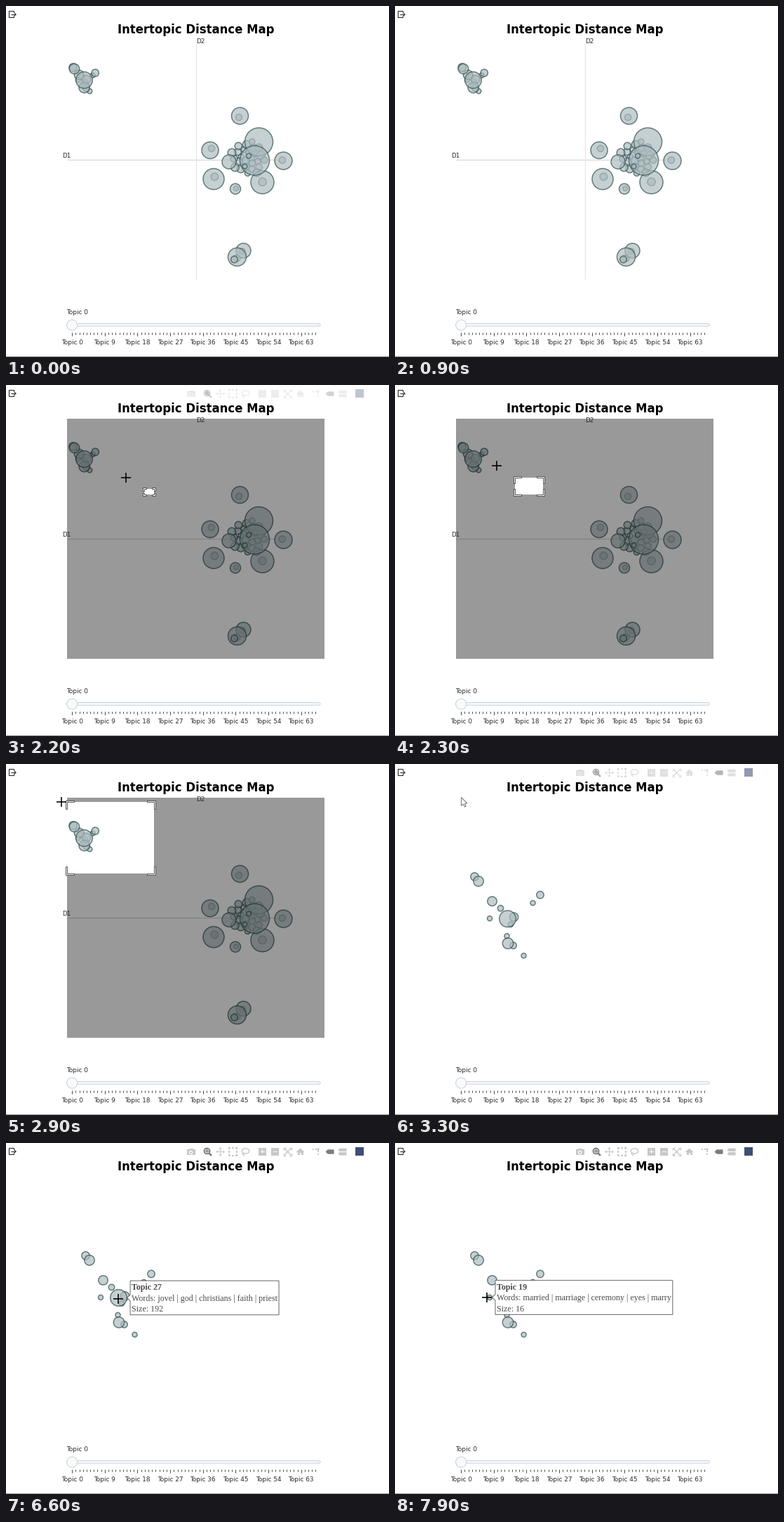
A matplotlib script that plays this animation: 546x500 px, repeating every 8 s.

```python
import numpy as np
import matplotlib.pyplot as plt
from matplotlib.animation import FuncAnimation
from matplotlib.patches import Circle, FancyBboxPatch, PathPatch, Polygon, Rectangle
from matplotlib.path import Path

W, H, DPI = 546, 500, 100
PX = 72 / DPI                       # points per pixel
LEFT, RIGHT, TOP, BOTTOM = 87, 454, 49, 391
DRAG = (211, 157)                   # where the zoom box begins
ZOOM_X, ZOOM_Y, ZOOM_TOP = 2.96, 3.33, 54.4
DRAG_ON, RELEASE = 2.1, 3.1
PALE, DARK = "#c7c7c7", "#7c7c7c"
rng = np.random.default_rng(5)

fig = plt.figure(figsize=(W / DPI, H / DPI), dpi=DPI, facecolor="white")
ax = fig.add_axes([0, 0, 1, 1])
ax.set_xlim(0.5, W + 0.5)
ax.set_ylim(H + 0.5, 0.5)
ax.axis("off")


def line(pts, color, width=1.0, z=1):
    x, y = zip(*pts)
    return ax.plot(x, y, color=color, lw=width * PX, zorder=z,
                   solid_capstyle="butt", solid_joinstyle="miter")[0]


def label(x, y, s, px=8.9, color="#2a2a2a", z=6, **kw):
    kw.setdefault("family", "DejaVu Sans")
    return ax.text(x, y, s, fontsize=px * PX, color=color, va="baseline", zorder=z, **kw)


def shape(patch, z=1):
    patch.set_zorder(z)
    return ax.add_patch(patch)


def bubble(x, y, r):
    return shape(Circle((x, y), r, fc="#AEBCBF", ec="#2F4F4F", lw=1.5 * PX, alpha=0.7), 2)


# ---- page furniture
label(271.5, 40, "Intertopic Distance Map", 16.5, "black", ha="center", weight="bold")
shape(Rectangle((0, H - 0.5), W + 1, 1, fc="#999999", ec="none"))
line([(11, 10), (11, 8), (4, 8), (4, 17), (11, 17), (11, 15)], "#2b2b2b", 1.1)
line([(7, 12.5), (14, 12.5)], "#2b2b2b", 1.1)
line([(12, 10), (14.5, 12.5), (12, 15)], "#2b2b2b", 1.1)

# ---- slider
label(87, 440, "Topic 0")
shape(FancyBboxPatch((87, 453), 361.5, 3.6, boxstyle="round,pad=0,rounding_size=1.8",
                     fc="#F8FAFC", ec="#C4CADB", lw=0.9 * PX))
shape(Circle((94.7, 455), 7.5, fc="#F8FBFB", ec="#C6CED8", lw=0.9 * PX), 2)
for k in range(68):
    x = 94.7 + 5.183 * k
    major = k % 9 == 0
    line([(x, 465.8), (x, 471 if major else 468.8)], "#333333", 0.9)
    if major:
        label(x, 483, f"Topic {k}", ha="center")

# ---- corner group, zoomed positions from the largest topic to the smallest
corner = [(161, 221), (161.5, 256), (119.5, 167.5), (139, 196), (170, 218.5), (114, 161),
          (207.5, 187), (169, 259), (151, 206), (165.5, 229), (197, 198.5), (135.5, 220.5),
          (160, 245.5), (184, 273.5)]


def rank_radius(k):
    return max(3.5, 8.2 - 0.5 * k) if k else 11.8


def unzoom(x, y):
    return LEFT + (x - LEFT) / ZOOM_X, ZOOM_TOP + (y - TOP) / ZOOM_Y


ranked = [(k, p) for k, p in enumerate(corner)][::-1]
detail = [bubble(*p, rank_radius(k)) for k, p in ranked]
overview = [bubble(*unzoom(*p), rank_radius(k)) for k, p in ranked]

# ---- other topics: a dense core, lone bubbles with a small one inside, and the largest
lone = [(334, 157, 12), (291.5, 206, 12), (296.5, 247, 15), (366, 251.5, 16.5),
        (396, 221, 12.5), (327.5, 261, 7.5), (339, 349, 10.5), (330, 358, 13)]
top = [(361, 194, 20), (355, 220.5, 21), (318.5, 222.5, 10),
       (326, 361.5, 4.8), (346.5, 214, 3.5), (341, 229, 3.4)]
for k in range(26):
    d, a = 25 * np.sqrt((k + 0.5) / 26), 2.4 * k
    overview.append(bubble(346 + d * np.cos(a), 217 + d * np.sin(a), rng.uniform(4, 6)))
for x, y, r in lone:
    dx, dy = rng.uniform(-0.22, 0.22, 2) * r
    overview.append(bubble(x + dx, y + dy, 1.5 + 0.25 * r))
overview += [bubble(*b) for b in lone + top]

overview += [line([(LEFT, 220), (385, 220)], "#d6d8d8", 1.2),
             label(81, 216.5, "D1"), label(272, 53.5, "D2")]
v_axis = line([(271, 55), (271, 390)], "#e2e5e6", 1.2)

# ---- zoom box
shade = shape(PathPatch(Path([(0, 0)]), fc="black", ec="none", alpha=0.4), 4)
marks = shape(PathPatch(Path([(0, 0)]), fc="white", ec="#444444", lw=0.9 * PX), 5)


def compound(polys):
    return Path.make_compound_path(*[Path(p + p[:1], closed=True) for p in polys])


def bracket(x, y, ox, oy, arm, thick=2):
    return [(x + ox * thick, y + oy * thick), (x - ox * arm, y + oy * thick),
            (x - ox * arm, y), (x, y), (x, y - oy * arm), (x + ox * thick, y - oy * arm)]


def set_zoom_box(x0, y0):
    x1, y1 = DRAG
    shade.set_path(compound([
        [(LEFT, TOP), (RIGHT, TOP), (RIGHT, BOTTOM), (LEFT, BOTTOM)],
        [(x0, y0), (x0, y1), (x1, y1), (x1, y0)]]))
    arm = min(x1 - x0, y1 - y0, 30) / 3
    marks.set_path(compound([bracket(x, y, ox, oy, arm) for x, ox in ((x0, -1), (x1, 1))
                             for y, oy in ((y0, -1), (y1, 1))]))


# ---- toolbar icons, each drawn around (x, MID)
MID = 13
SIGNS = (-1, 1)


def box(x, dy, w, h, color=PALE):
    return shape(Rectangle((x - w / 2, MID + dy - h / 2), w, h, fc=color, ec="none"), 6)


def disc(x, dy, r, color=PALE):
    return shape(Circle((x, MID + dy), r, fc=color, ec="none"), 6)


def poly(x, pts, color=PALE):
    return shape(Polygon([(x + u, MID + v) for u, v in pts], fc=color, ec="none"), 6)


def stroke(x, pts, color=PALE, width=1.4):
    return line([(x + u, MID + v) for u, v in pts], color, width, 6)


def camera(x):
    return [box(x, 1, 12, 8), box(x, -3.5, 6, 2), disc(x, 1, 2.8, "white"), disc(x, 1, 1.5)]


def plus(x, dy=0, color="white"):
    return [box(x, dy, 6, 1.7, color), box(x, dy, 1.7, 6, color)]


def magnifier(x):
    return [disc(x - 1, -1, 4.9, DARK), stroke(x, [(1, 1), (5.5, 5.5)], DARK, 2.6),
            disc(x - 1, -1, 3.3, "#d5d5d5")] + plus(x - 1, -1, DARK)


def pan(x):
    heads = [[(6.5, 0), (4, 2.3), (4, -2.3)], [(-6.5, 0), (-4, 2.3), (-4, -2.3)]]
    heads += [[(v, u) for u, v in h] for h in heads]
    return [box(x, 0, 10, 1.4), box(x, 0, 1.4, 10)] + [poly(x, h) for h in heads]


def dashed_box(x):
    return [part for e in (-5.5, 5.5) for d in (-4.7, 0, 4.7)
            for part in (box(x + d, e, 2.6, 1.3), box(x + e, d, 1.3, 2.6))]


def lasso(x):
    a = np.linspace(0, 2 * np.pi, 40)
    return [stroke(x, list(zip(5.3 * np.cos(a), -1 - 3.6 * np.sin(a)))),
            stroke(x, [(-3.5, 1), (-4, 3.5), (-1.5, 5.5)])]


def zoom_in(x):
    return [box(x, 0, 11, 11)] + plus(x)


def zoom_out(x):
    return [box(x, 0, 11, 11), box(x, 0, 6, 1.7, "white")]


def autoscale(x):
    parts = []
    for sx in SIGNS:
        for sy in SIGNS:
            parts += [stroke(x, [(0, 0), (4.5 * sx, 4.5 * sy)]),
                      stroke(x, [(2.2 * sx, 5.5 * sy), (5.5 * sx, 5.5 * sy),
                                 (5.5 * sx, 2.2 * sy)])]
    return parts


def home(x):
    return [poly(x, [(-6, 0.5), (0, -5), (6, 0.5)]), box(x, 2.4, 8, 4.4),
            box(x, 3.3, 2, 2.8, "white")]


def spikes(x):
    return ([disc(x + 1.5, -3.5, 1.7)] + [box(x - d, -3.5, 2, 1.3) for d in (2, 5.5)]
            + [box(x + 1.5, d, 1.3, 2) for d in (0, 3.5)])


def tag(x, dy, h, color):
    return poly(x, [(-6, dy), (h - 6, dy - h), (6, dy - h), (6, dy + h), (h - 6, dy + h)], color)


def hover_one(x):
    return [tag(x, 0, 3.2, DARK)]


def hover_all(x):
    return [tag(x, dy, 2.2, PALE) for dy in (-2.7, 2.8)]


def badge(x):
    return [box(x, 0, 12, 12, "#3f4f75")]


groups = [[camera], [magnifier, pan, dashed_box, lasso], [zoom_in, zoom_out, autoscale, home],
          [spikes, hover_one, hover_all], [badge]]
toolbar, x = [], 264
for group in groups:
    for icon in group:
        toolbar += icon(x)
        x += 18
    x += 6


# ---- hover labels
def tooltip(point, topic, words, size):
    x, y = point
    tip = x + 0.87 * np.sqrt(size)
    x0 = tip + 4.5
    rows = [(f"Topic {topic}", "bold"), ("Words: " + " | ".join(words), "normal"),
            (f"Size: {size}", "normal")]
    texts = [label(x0 + 2.3, y - 11.2 + 15.6 * k, s, 12, "#4c4c4c", z=9,
                   family="Liberation Serif", weight=w) for k, (s, w) in enumerate(rows)]
    x1 = x0 + 4 + texts[1].get_window_extent(fig.canvas.get_renderer()).width
    t, b = y - 24.3, y + 24.3
    frame = Polygon([(tip, y), (x0, y - 4.5), (x0, t), (x1, t), (x1, b), (x0, b), (x0, y + 4.5)],
                    fc="white", ec="#555555", lw=0.9 * PX)
    return texts + [shape(frame, 8)]


tips = [
    (4.5, 5.7, tooltip(corner[4], 24, ["hell", "atheists", "atheist", "god", "exist"], 63)),
    (5.7, 7.0, tooltip(corner[0], 27, ["jovel", "god", "christians", "faith", "priest"], 192)),
    (7.0, 8.0, tooltip(corner[11], 19,
                       ["married", "marriage", "ceremony", "eyes", "marry"], 16)),
]

# ---- pointer
cross = [line([(0, 0), (1, 0)], "black", 1.6, 11) for _ in range(2)]
arrow = shape(Polygon([(0, 0), (1, 0), (0, 1)], fc="white", ec="#666666", lw=0.9 * PX), 11)
ARROW = np.array([(0, 0), (0, 12), (2.8, 9.5), (4.8, 13.6), (6.6, 12.8), (4.8, 8.9), (8.4, 8.6)])

ENTER = 1.1
START = (480, 95)
# start time, end time and goal of each pointer move
MOVES = [(ENTER, 1.7, (225, 151)), (1.7, 1.9, DRAG), (2.05, 2.3, (146, 116)),
         (2.3, 2.7, (79, ZOOM_TOP)), (RELEASE, 3.3, (95, 48)), (3.3, 4.5, (177, 209)),
         (5.4, 6.0, (160.5, 223)), (6.7, 7.3, (131, 220.5))]


def pointer(t):
    pos = np.array(START, float)
    for t0, t1, goal in MOVES:
        pos += (np.array(goal) - pos) * np.clip((t - t0) / (t1 - t0), 0, 1)
    return pos


def show(artists, on):
    for a in artists:
        a.set_visible(bool(on))


def update(i):
    t = i / 10 + 1e-6
    dragging = DRAG_ON <= t < RELEASE
    zoomed = t >= RELEASE
    show(overview, not zoomed)
    show([v_axis], not zoomed and not dragging)
    show(detail, zoomed)

    show([shade, marks], dragging)
    if dragging:
        x, y = pointer(t - 0.1)     # the box trails the pointer
        set_zoom_box(max(x, LEFT), y)

    fade = np.interp(t, [1.1, 1.3, 2.0, 2.3, 3.1, 3.45], [0, 1, 1, 0, 0, 1])
    show(toolbar, fade > 0.02)
    for a in toolbar:
        a.set_alpha(float(fade))

    for start, end, parts in tips:
        show(parts, start <= t < end)

    x, y = pointer(t)
    is_arrow = zoomed and y < TOP + 6
    show(cross, t >= ENTER and not is_arrow)
    show([arrow], is_arrow)
    cross[0].set_data([x - 7, x + 7], [y, y])
    cross[1].set_data([x, x], [y - 7, y + 7])
    arrow.set_xy(ARROW + (x, y))
    return []


anim = FuncAnimation(fig, update, frames=80, interval=100, repeat=True, repeat_delay=0)
plt.show()
```
